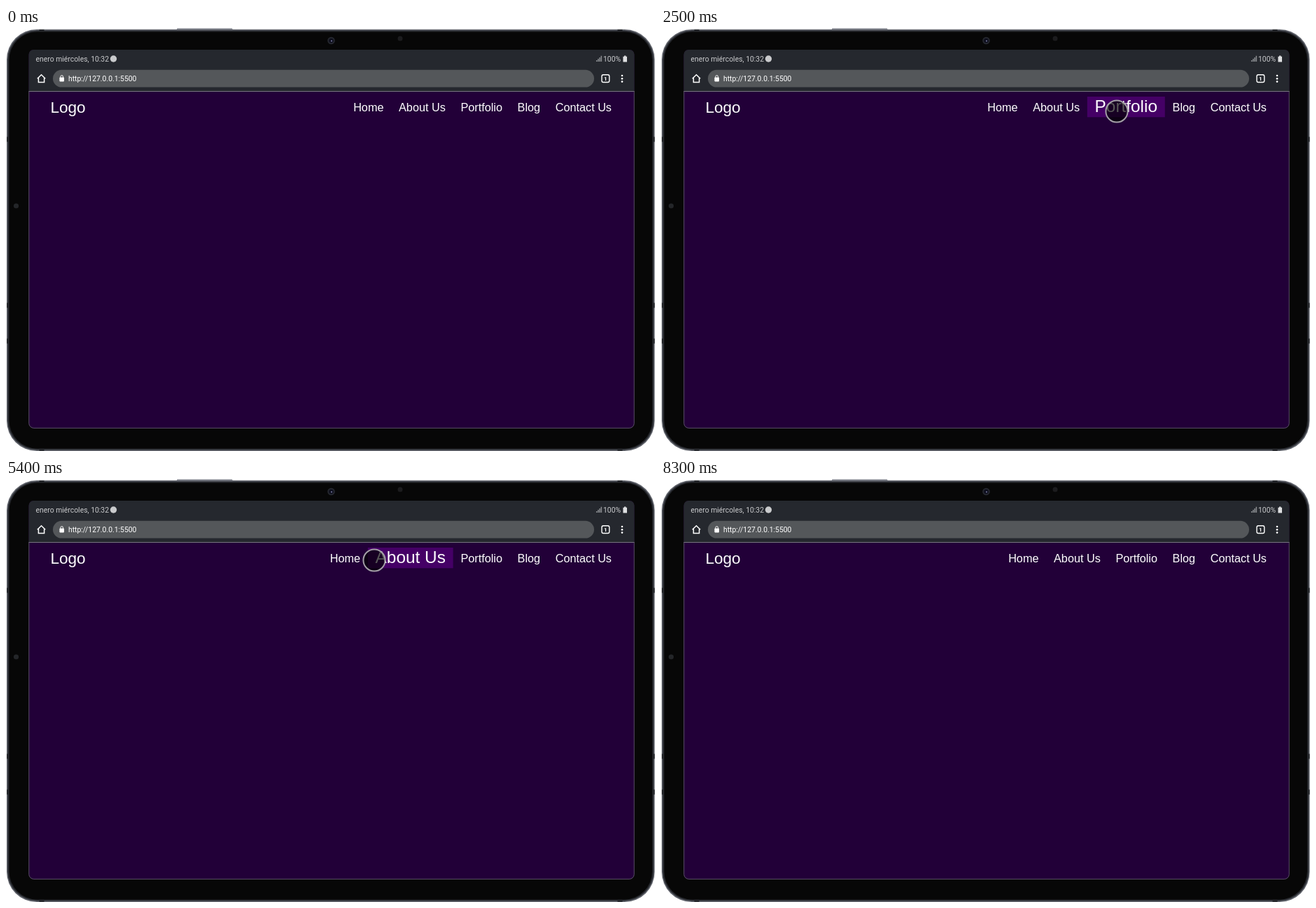
Recreate the animation shown at these times as an HTML page. Size 927 by 604 pixels, loop 9900 ms.

```html
<!DOCTYPE html>
<html lang="es">
<head>
<meta charset="utf-8">
<style>
html, body { margin: 0; width: 100%; height: 100%; overflow: hidden; background: #fff; }
svg { display: block; width: 927px; height: 604px; }
.ui { font: 10.4px Roboto, "Noto Sans", sans-serif; fill: #c9cacc; }
.page { font-family: "Liberation Sans", Arial, sans-serif; fill: #fff; }
</style>
</head>
<body>
<svg viewBox="0 0 927 604">
  <!-- tablet body -->
  <rect x="244" y="0.5" width="79.5" height="6" rx="1" fill="#858891"/>
  <rect x="1" y="2" width="925.5" height="602" rx="43" fill="#5d6068"/>
  <rect x="2.5" y="3.8" width="922.5" height="598.4" rx="41.5" fill="#26282d"/>
  <rect x="4.5" y="5.5" width="918.5" height="595" rx="40" fill="#070707"/>
  <g id="gaps" fill="#25272b"></g>
  <circle cx="464.5" cy="18" r="5.3" fill="#25272e"/>
  <circle cx="464.5" cy="18" r="3.2" fill="#0d0e1c"/>
  <circle cx="465" cy="18.5" r="1.1" fill="#7779a0"/>
  <circle cx="563" cy="15" r="3.5" fill="#1c1c1e"/>
  <circle cx="14.5" cy="254" r="3.6" fill="#242629"/>

  <!-- screen -->
  <clipPath id="screen"><rect x="32.5" y="31" width="865" height="540.5" rx="7"/></clipPath>
  <g clip-path="url(#screen)">
    <rect x="32" y="31" width="866" height="541" fill="#220038"/>
    <rect x="32" y="31" width="866" height="59.5" fill="#25282e"/>
    <rect x="32" y="90" width="866" height="1" fill="#77747f"/>
  </g>
  <path d="M32.8 90V564.5a7 7 0 0 0 7 6.8H890.2a7 7 0 0 0 7-6.8V90" fill="none" stroke="#5f5a69" stroke-width=".9"/>

  <!-- status bar -->
  <g class="ui">
    <text x="42.5" y="47.8">enero miércoles, 10:32</text>
    <circle cx="153.5" cy="44" r="4.7"/>
    <text x="853" y="47.8">100%</text>
    <path d="M843 46h1.5v2h-1.5zM845.2 44h1.5v4h-1.5zM847.4 42h1.5v6h-1.5zM849.6 39.8h1.5v8.2h-1.5z" fill="#8d8f93"/>
    <path d="M883 39.5h2.4v1.2h1.6v7.8h-5.6v-7.8h1.6z" fill="#dedfe1"/>
  </g>

  <!-- address bar -->
  <rect x="67" y="59.8" width="773" height="24.8" rx="12.4" fill="#54575a"/>
  <path d="M44.8 72.3l5.7-5.6 5.7 5.6M46.4 71.2v6.3h8.2v-6.3" fill="none" stroke="#fff" stroke-width="1.5"/>
  <rect x="76.4" y="70.6" width="6.6" height="5.8" rx=".8" fill="#fff"/>
  <path d="M77.9 71v-1.5a1.8 1.8 0 0 1 3.6 0V71" fill="none" stroke="#fff"/>
  <text class="ui" x="89" y="76" style="fill:#fff">http://127.0.0.1:5500</text>
  <rect x="851" y="66.7" width="10.8" height="10.8" rx="2.2" fill="none" stroke="#fff" stroke-width="1.4"/>
  <text class="ui" x="856.4" y="75" text-anchor="middle" style="fill:#fff;font-size:8px;font-weight:700">1</text>
  <g fill="#fff"><circle cx="880" cy="68" r="1.35"/><circle cx="880" cy="72.3" r="1.35"/><circle cx="880" cy="76.6" r="1.35"/></g>

  <!-- page -->
  <g class="page">
    <text x="63.4" y="121" font-size="22.6">Logo</text>
    <rect id="glow" y="98" height="29.3" fill="#450066"/>
    <g id="nav" text-anchor="end"></g>
  </g>
  <g clip-path="url(#screen)">
    <circle id="touch" r="15.6" fill="#000" fill-opacity=".66" stroke="#a3a0a6" stroke-width="2"/>
  </g>
</svg>
<script>
const LOOP = 9900, STEP = 100, SIZE = 16.24, PAD = 10.8, GROW = 1.5, EDGE = 875.8;
const $ = id => document.getElementById(id);
const add = (parent, tag, attrs) => {
  const el = document.createElementNS('http://www.w3.org/2000/svg', tag);
  set(el, attrs);
  return parent.appendChild(el);
};
function set(el, attrs) {
  for (const k in attrs) el.setAttribute(k, attrs[k]);
}

// antenna gaps in the metal rim
for (const y of [155.5, 392.5, 443.5])
  for (const x of [1, 923.5]) add($('gaps'), 'rect', { x, y, width: 3, height: 7 });
for (const x of [47.5, 873.5])
  for (const y of [2, 600.8]) add($('gaps'), 'rect', { x, y, width: 7, height: 3 });

const links = ['Home', 'About Us', 'Portfolio', 'Blog', 'Contact Us'].map(label => {
  const el = add($('nav'), 'text', { 'font-size': SIZE });
  el.textContent = label;
  return { el, width: el.getComputedTextLength() };
});
links.reduceRight((right, link) => {
  link.left = right - link.width - 2 * PAD;
  link.bigLeft = right - link.width * GROW - 2 * PAD;
  return link.left;
}, EDGE);

// pointer path: time, x, y
const path = [
  [200, 452, 560], [600, 468, 330], [1000, 486, 150], [1100, 489, 126],
  [1400, 504, 117], [1500, 504, 117], [2500, 651, 119], [3800, 806, 117],
  [4000, 806, 117], [4300, 728, 116], [5400, 526, 116], [5800, 488, 116],
  [6100, 488, 116], [6700, 630, 116], [7500, 815, 118], [7800, 832, 230],
  [8200, 846, 530]
];

function pointer(t) {
  const i = path.findIndex(p => p[0] > t);
  if (i === 0) return null;
  if (i < 0) return t === 8200 ? path.at(-1).slice(1) : null;
  const a = path[i - 1], b = path[i], k = (t - a[0]) / (b[0] - a[0]);
  return [a[1] + (b[1] - a[1]) * k, a[2] + (b[2] - a[2]) * k];
}

// A grown link keeps the hover until its own edge is crossed, so direction matters.
function hovered(t, [x, y]) {
  if (y > 124 || x > EDGE) return -1;
  const side = t > 3800 && t < 6200 ? 'bigLeft' : 'left';
  return links.findLastIndex(link => x > link[side]);
}

function draw(now) {
  const t = Math.floor(now % LOOP / STEP) * STEP;
  const pos = pointer(t);
  const hot = pos ? hovered(t, pos) : -1;
  $('touch').style.display = pos ? '' : 'none';
  if (pos) set($('touch'), { cx: pos[0], cy: pos[1] });
  $('glow').style.display = hot < 0 ? 'none' : '';
  let right = EDGE;
  for (let i = links.length - 1; i >= 0; i--) {
    const { el, width } = links[i], on = i === hot, scale = on ? GROW : 1;
    const box = width * scale + 2 * PAD;
    set(el, { x: right - PAD, y: on ? 120.4 : 118.8, 'font-size': SIZE * scale });
    if (on) set($('glow'), { x: right - box, width: box });
    right -= box;
  }
}

const start = performance.now();
(function tick() {
  draw(performance.now() - start);
  requestAnimationFrame(tick);
})();
</script>
</body>
</html>
```
